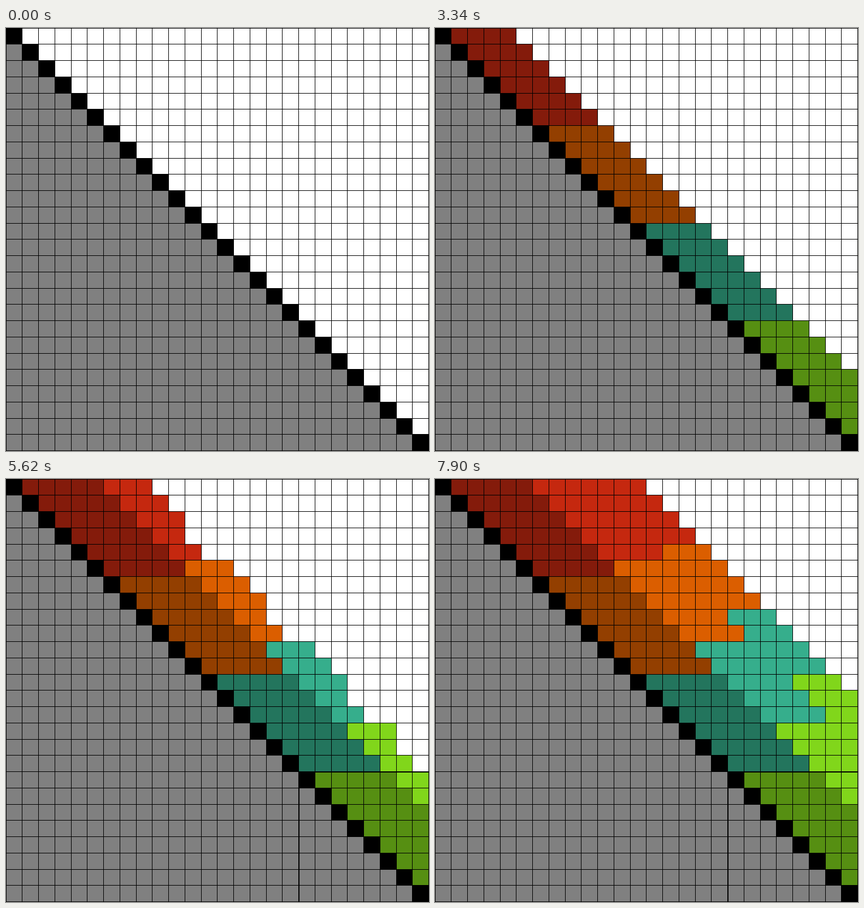
An HTML page with a canvas for the animation above (8 s loop, 748 px wide and 748 px high).

```html
<!DOCTYPE html>
<html lang="en">
<head>
<meta charset="utf-8">
<title>Diagonal wavefront</title>
<style>
  html, body { margin: 0; width: 100%; height: 100%; overflow: hidden; background: #fff; }
  canvas { display: block; }
</style>
</head>
<body>
<canvas id="stage" width="748" height="748"></canvas>
<script>
const ctx = document.getElementById('stage').getContext('2d');
const CELLS = 26, PITCH = 28.75, BANDS = 4;
const LOOP = 8000, FIRST_STEP = 460, STEP = 120;
const DARK = ['#841b0b', '#933f00', '#23755d', '#568f12'];
const BRIGHT = ['#c5280f', '#db5e00', '#36ae8c', '#81d61b'];
const OUTLINE_STEP = 41, OUTLINE_CELL = 18;

const edge = k => Math.floor(k * PITCH);

function fillCells(row, col, count, color) {
  ctx.fillStyle = color;
  ctx.fillRect(edge(col), edge(row), edge(col + count) - edge(col), edge(row + 1) - edge(row));
}

// Each diagonal is split into bands of rows that all finish on the same step.
function drawDiagonals(steps) {
  for (let diag = 1; steps > 0 && diag < CELLS; diag++) {
    const length = CELLS - diag;
    const chunk = Math.ceil(Math.min(length, 24) / BANDS);
    const duration = Math.max(chunk, length - (BANDS - 1) * chunk);
    const colors = diag > 5 ? BRIGHT : DARK;
    for (let band = 0; band < BANDS; band++) {
      const start = band * chunk;
      const size = band === BANDS - 1 ? length - start : chunk;
      const done = Math.min(size, steps - (duration - size));
      for (let i = 0; i < done; i++) {
        fillCells(start + i, start + i + diag, 1, colors[band]);
      }
    }
    steps -= duration;
  }
}

function drawGrid(steps) {
  ctx.fillStyle = '#000';
  for (let k = 0; k <= CELLS; k++) {
    ctx.fillRect(edge(k), 0, 1, 748);
    ctx.fillRect(0, edge(k), 748, 1);
  }
  if (steps >= OUTLINE_STEP) {
    const p = edge(OUTLINE_CELL);
    ctx.fillRect(p, p, 2, 748 - p);
    ctx.fillRect(p, p, 748 - p, 2);
  }
}

function draw(steps) {
  ctx.fillStyle = '#fff';
  ctx.fillRect(0, 0, 748, 748);
  for (let i = 0; i < CELLS; i++) {
    fillCells(i, 0, i, '#808080');
    fillCells(i, i, 1, '#000');
  }
  drawDiagonals(steps);
  drawGrid(steps);
}

function frame() {
  const time = performance.now() % LOOP;
  draw(Math.max(0, Math.floor((time - FIRST_STEP) / STEP) + 1));
  requestAnimationFrame(frame);
}
frame();
</script>
</body>
</html>
```
